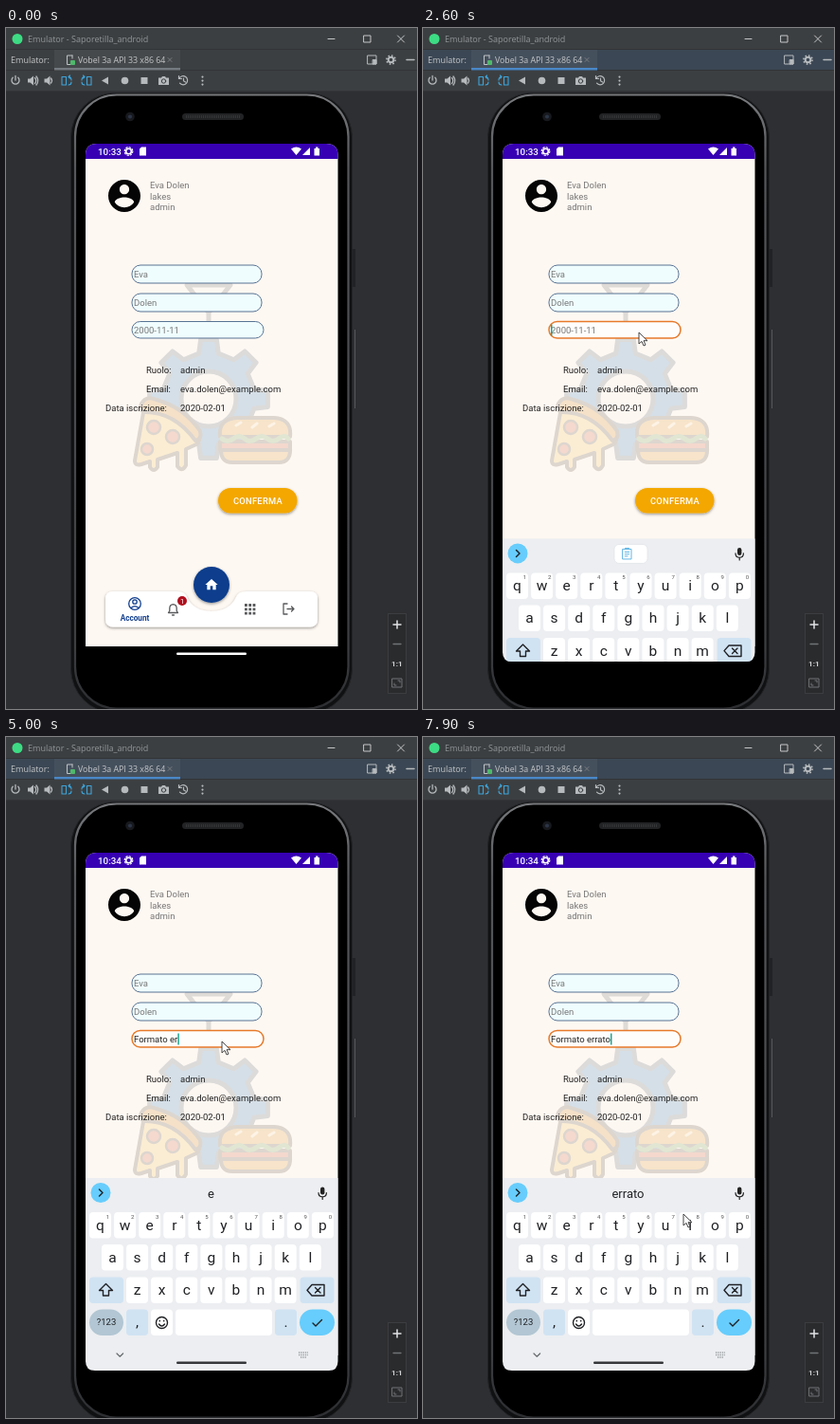
Recreate the animation shown at these times as an HTML page. Size 434 px wide and 718 px high, loop 8 s.

```html
<!DOCTYPE html>
<html lang="it">
<head>
<meta charset="utf-8">
<title>Profile form</title>
<style>
  html, body { margin: 0; width: 100%; height: 100%; overflow: hidden; background: #2e2f32; }
  svg { display: block; width: 100%; height: 100%; }
  text { font-family: Roboto, sans-serif; font-size: 9.5px; white-space: pre; }
  .ide text { font-family: "Open Sans", sans-serif; font-size: 9px; }
  .line { fill: none; stroke-linecap: round; stroke-linejoin: round; }
  .mid { text-anchor: middle; }
  .hint { fill: #777; }
  .field { fill: #f0fdfe; stroke: #587394; stroke-width: 1; }
</style>
</head>
<body>
<svg viewBox="0 0 434 718" preserveAspectRatio="none">
  <defs>
    <clipPath id="screenClip"><path d="M84 138V134Q84 122 96 122H338Q350.5 122 350.5 134V658Q350.5 668 341 668H94Q84 668 84 658Z"/></clipPath>
    <linearGradient id="rim" x2="0" y2="1">
      <stop offset="0" stop-color="#77797c"/><stop offset=".12" stop-color="#55575a"/>
      <stop offset=".9" stop-color="#3c3e41"/><stop offset="1" stop-color="#2c2d30"/>
    </linearGradient>
    <filter id="shadow" x="-20%" y="-30%" width="140%" height="180%">
      <feDropShadow dx="0" dy="1.2" stdDeviation="1.5" flood-opacity=".42"/>
    </filter>
  </defs>

  <g class="ide">
    <rect width="434" height="718" fill="#2e2f32"/>
    <rect width="434" height="66" fill="#3c3f41"/>
    <rect id="tabRow" y="23" width="434" height="21.5"/>
    <path d="M0 22.5H434M0 44.5H434M0 66.5H434" stroke="#323437"/>
    <circle cx="12" cy="11.5" r="5.5" fill="#3ddc84"/>
    <text x="23" y="15" fill="#929699">Emulator - Saporetilla_android</text>
    <path class="line" stroke="#c4c6c8" d="M340 11.5H347M378 8H385V15H378ZM413.5 8L420.5 15M420.5 8L413.5 15"/>
    <text x="5" y="37" fill="#c5c7c9">Emulator:</text>
    <rect x="51" y="23" width="133" height="21" fill="#fff" opacity=".05"/>
    <rect id="tabLine" x="51" y="42" width="133" height="2.5"/>
    <path class="line" stroke="#bfc3c6" d="M70 29H64.5V38.5H68M70 29V32"/>
    <rect x="68" y="34" width="5" height="5" rx="1" fill="#4fb86b"/>
    <text x="76" y="37" fill="#c5c7c9" style="font-size:8.8px">Vobel 3a API 33 x86 64</text>
    <path class="line" stroke="#777b7e" d="M171 31.5L175 35.5M175 31.5L171 35.5"/>
    <g stroke="#b6babd" class="line">
      <path d="M382 29H391V38H382Z"/><path fill="#b6babd" d="M387.5 33.5H391V38H387.5Z"/>
      <path stroke-width="1.5" d="M423 33.5H431"/>
      <circle cx="406.5" cy="33.5" r="2.8" stroke-width="2"/>
      <circle cx="406.5" cy="33.5" r="4.6" stroke-width="1.6" stroke-dasharray="1.6 2" stroke-linecap="butt"/>
      <path stroke-width="1.3" d="M7.2 52.3A4 4 0 1 0 12.8 52.3M10 50.5V55M30.5 52.5Q33 55.5 30.5 58.5M32 51Q35.5 55.5 32 60M47.5 53Q49.5 55.5 47.5 58"/>
      <path fill="#b6babd" stroke="none" d="M23 53.5H25.5L29 50.5V60.5L25.5 57.5H23ZM40.5 53.5H43L46.5 50.5V60.5L43 57.5H40.5ZM108 51.5V59.5L101 55.5ZM142.5 52H149.5V59H142.5ZM161 52.5H164L165 51H168L169 52.5H172V60H161Z"/>
      <circle cx="125.5" cy="55.5" r="3.8" fill="#b6babd" stroke="none"/>
      <circle cx="166.5" cy="56" r="2.2" fill="#b6babd" stroke="#3c3f41"/>
      <path stroke-width="1.2" d="M183 53A4.6 4.6 0 1 1 183.5 58.2M182.5 50.5V53.5H185.5M187.5 53V55.8L189.5 57"/>
      <path stroke-width="2.2" d="M207.5 51.5v.1M207.5 55.5v.1M207.5 59.5v.1"/>
    </g>
    <g class="line" stroke="#3da5dc" stroke-width="1.1">
      <path d="M59 51.5H63.5V60H59ZM66 51.5Q69 51.5 69 55M66 60Q69 60 69 57M67.5 50L66 51.5L67.5 53"/>
      <path d="M85.5 51.5H90V60H85.5ZM83 51.5Q80 51.5 80 55M83 60Q80 60 80 57M81.5 50L83 51.5L81.5 53"/>
    </g>
  </g>

  <g id="phone">
    <path d="M366 233H369V273H366Z" fill="#212225"/>
    <path d="M368.5 318V401" stroke="#55585b"/>
    <rect x="68.5" y="68.5" width="297" height="654" rx="47" fill="#101112" stroke="#232427"/>
    <rect x="73" y="70.5" width="288.5" height="647" rx="44" fill="#000" stroke="url(#rim)" stroke-width="2.2"/>
    <circle cx="131" cy="93.5" r="4.8" fill="#17191d"/><circle cx="131" cy="93.5" r="2.1" fill="#2c3546"/>
    <rect x="186" y="90" width="65" height="7" rx="3.5" fill="#222325"/>
    <path d="M190 93.5H247" stroke="#343638" stroke-width="3" stroke-dasharray="1 1"/>
  </g>

  <g clip-path="url(#screenClip)">
    <rect x="84" y="122" width="267" height="530" fill="#fef8f2"/>

    <g id="art" class="line" stroke="#dedad6" stroke-width="5">
      <path d="M191 271H237L214 300ZM214 300V328M204 283H224"/>
      <path id="gear" fill="#d5dfe7" stroke="#dcdbda" stroke-width="5"/>
      <circle cx="214" cy="391" r="29" fill="#fdf7f1" stroke="#dcdbda" stroke-width="5"/>
      <g stroke="#ddd6cf" stroke-width="4">
        <path fill="#fbedd3" d="M146 400L136 456Q136 462 143 460L152 457V463Q156 469 160 463V455L181 448V462Q186 469 190 461V444L201 439Q206 435 203 429Q182 401 148 397Z"/>
        <path fill="#f5e1c8" d="M143 396Q148 387 159 392Q188 400 205 425Q207 434 200 435Q178 405 147 405Q140 403 143 396Z"/>
        <g fill="#f5d9ce" stroke-width="2.5"><circle cx="156" cy="421" r="7"/><circle cx="176" cy="431" r="7"/><circle cx="149" cy="444" r="6"/></g>
        <path fill="#f7e4ca" d="M226 431Q224 412 244 411H283Q302 412 300 431Z"/>
        <path fill="#f7e4ca" d="M227 443H300Q301 458 288 458H239Q226 458 227 443Z"/>
        <path fill="#f4d8cd" d="M226 436H300V445H226Z"/>
        <path stroke="#e1e6d3" stroke-width="5" d="M228 433Q234 438 240 433T252 433T264 433T276 433T288 433T298 433"/>
        <path stroke="#fdf3e6" stroke-width="3" d="M243 419L248 416M260 421L265 417M278 420L283 417"/>
      </g>
    </g>

    <rect x="84" y="122" width="267" height="16" fill="#3700b3"/>
    <text id="clock" x="97" y="133.5" fill="#fff" style="font-size:9.8px;font-weight:500"></text>
    <circle cx="129.5" cy="130" r="2.8" class="line" stroke="#fff" stroke-width="1.6"/>
    <circle cx="129.5" cy="130" r="4.3" class="line" stroke="#fff" stroke-width="1.2" stroke-dasharray="1.4 2"/>
    <path fill="#fff" d="M143 125.5H148V134.5H141V127.5ZM301 127.5Q306.5 123.5 312 127.5L306.5 134ZM313 134L321 126V134ZM325.5 127H327V125.5H329.5V127H331V134.5H325.5Z"/>

    <path transform="translate(104.6 156.6) scale(1.7)" fill="#050505" d="M12 2C6.48 2 2 6.48 2 12s4.48 10 10 10 10-4.48 10-10S17.52 2 12 2zm0 3c1.66 0 3 1.34 3 3s-1.34 3-3 3-3-1.34-3-3 1.34-3 3-3zm0 14.2c-2.5 0-4.71-1.28-6-3.22.03-1.99 4-3.08 6-3.08 1.99 0 5.97 1.09 6 3.08-1.29 1.94-3.5 3.22-6 3.22z"/>
    <g class="hint">
      <text x="152" y="169">Eva Dolen</text><text x="152" y="180.5">lakes</text><text x="152" y="192">admin</text>
    </g>
    <rect class="field" x="133" y="250" width="137" height="19" rx="9"/>
    <rect class="field" x="133" y="280" width="137" height="19" rx="9"/>
    <rect class="field" id="dateBox" x="133" y="309.5" width="139" height="17.5" rx="8.7"/>
    <text class="hint" x="135" y="263">Eva</text>
    <text class="hint" x="135" y="293">Dolen</text>
    <text id="date" x="135" y="322"></text>
    <rect id="caret" y="312.5" width="1.5" height="12" fill="#1fa58f"/>
    <g fill="#222">
      <text x="148" y="364">Ruolo:</text><text x="184" y="364">admin</text>
      <text x="148" y="384">Email:</text><text x="184" y="384">eva.dolen@example.com</text>
      <text x="105" y="404">Data iscrizione:</text><text x="184" y="404">2020-02-01</text>
    </g>

    <rect x="224" y="485" width="83.5" height="26.5" rx="13.2" fill="#f3a704" filter="url(#shadow)"/>
    <text class="mid" x="266" y="502" fill="#fff" style="font-size:9.3px;font-weight:500;letter-spacing:.3px">CONFERMA</text>

    <path fill="#fff" filter="url(#shadow)" d="M113 594H180Q189 594 191 600Q198 615 217 615Q236 615 243 600Q245 594 254 594H321Q329 594 329 602V623Q329 631.5 321 631.5H113Q105 631.5 105 623V602Q105 594 113 594Z"/>
    <circle cx="217" cy="587" r="19" fill="#0b3d8c" filter="url(#shadow)"/>
    <path transform="translate(209 579) scale(.667)" fill="#fff" d="M10 20v-6h4v6h5v-8h3L12 3 2 12h3v8z"/>
    <g class="line" stroke="#123f8f" stroke-width="1.3">
      <circle cx="136" cy="607" r="6.3"/><circle cx="136" cy="605" r="2.2"/><path d="M132 611.5Q136 607.8 140 611.5"/>
    </g>
    <text class="mid" x="136" y="624.5" fill="#123f8f" style="font-size:8.2px;font-weight:700">Account</text>
    <g class="line" stroke="#58595b" stroke-width="1.3">
      <path d="M171.5 616.5H181.5L180.2 614.5V611.5Q180 608 176.5 607.6Q173 608 172.8 611.5V614.5ZM175.5 619H177.5"/>
      <path d="M297 607H293V618H297M297 612.5H304M301.5 610L304 612.5L301.5 615"/>
      <path stroke-width="2.8" stroke-linecap="butt" stroke-dasharray="2.8 1.5" d="M252 608.5H264M252 612.8H264M252 617.1H264"/>
    </g>
    <circle cx="186" cy="604" r="5" fill="#b00e1e"/>
    <text class="mid" x="186" y="606.8" fill="#fff" style="font-size:7.5px">1</text>

    <rect x="84" y="652" width="267" height="16" fill="#000"/>
    <g id="board">
      <rect x="84" y="465" width="267" height="204" fill="#eceef1"/>
      <circle cx="100" cy="480.5" r="10.5" fill="#67cdfc"/>
      <path class="line" stroke="#20262b" stroke-width="1.5" d="M98.5 477L102 480.5L98.5 484"/>
      <g id="clip">
        <rect x="202" y="471" width="35" height="20" rx="5" fill="#fff" stroke="#e0e3e7" stroke-width=".7"/>
        <path class="line" stroke="#62b6e4" d="M211 476H220V486.5H211ZM213.5 475H217.5M213.3 479H217.7M213.3 481.3H217.7M213.3 483.5H216"/>
      </g>
      <text id="word" class="mid" x="216.5" y="486" fill="#202124" style="font-size:13px"></text>
      <rect x="332" y="474.5" width="4.4" height="8" rx="2.2" fill="#222"/>
      <path class="line" stroke="#222" stroke-width="1.2" d="M330 480.5Q330 484.8 334.2 484.8Q338.4 484.8 338.4 480.5M334.2 485V487.5"/>
      <g id="keys"></g>
      <g class="line" stroke="#202124" stroke-width="1.4">
        <path d="M105.5 576.5L98.5 583.5H102.5V589H108.5V583.5H112.5Z"/>
        <path d="M318 583.2L323 577.5H336V589H323ZM326.5 580.5L332 586M332 580.5L326.5 586"/>
        <circle cx="164.5" cy="617.5" r="6"/><path d="M161.5 619Q164.5 623 167.5 619"/>
        <path stroke-width="1.7" d="M162.3 615.5v.1M166.7 615.5v.1"/>
        <path d="M324 618L327 621L333.5 614.5"/>
        <path stroke="#66696c" stroke-width="1.2" d="M117 650L120.3 653.2L123.6 650"/>
      </g>
      <path stroke="#9a9da0" stroke-width="1.3" stroke-dasharray="1.3 1" d="M309 649H319M309 651.5H319M311 654H317"/>
    </g>
  </g>
  <rect id="pill" x="180" y="658.5" width="74" height="2.6" rx="1.3"/>

  <g>
    <rect x="403.5" y="617.5" width="19" height="84" fill="#2a2b2d" stroke="#3b3d40"/>
    <path class="line" stroke="#e2e4e6" stroke-width="1.5" d="M409 629H417M413 625V633"/>
    <path class="line" stroke="#707376" stroke-width="1.3" d="M409 649.5H417"/>
    <text class="mid" x="412.8" y="673" fill="#d2d4d6" style="font-size:8px;font-weight:700">1:1</text>
    <path class="line" stroke="#707376" d="M408 686H418V695H408ZM410 691V693H412M414 688H416V690"/>
  </g>
  <path id="pointer" d="M0 0V12L3 9.4L5 14L7 13.1L5 8.7H9Z" fill="#fff" stroke="#333" stroke-width=".9"/>
</svg>

<script>
const LOOP = 8000, STEP = 100;
const FOCUS = 2500, TYPE_AT = 3600, KEY_MS = 150, BLINK = 500;
const PHRASE = 'Formato errato';
const $ = id => document.getElementById(id);
const parts = ['tabRow', 'tabLine', 'clock', 'dateBox', 'date', 'caret', 'board', 'clip', 'word', 'pill', 'pointer'];
const ui = Object.fromEntries(parts.map(id => [id, $(id)]));

// Pointer path: time, x, y
const PATH = [[2000, 395, 400], [2300, 228, 321], [7300, 228, 321], [7900, 275, 503]];

function gearPath(cx, cy, teeth, outer, root) {
  const points = [];
  const slice = 2 * Math.PI / teeth;
  for (let i = 0; i < teeth; i++) {
    for (const [shift, r] of [[-.27, root], [-.17, outer], [.17, outer], [.27, root]]) {
      const a = (i + shift) * slice - Math.PI / 2;
      points.push((cx + r * Math.cos(a)).toFixed(1) + ' ' + (cy + r * Math.sin(a)).toFixed(1));
    }
  }
  return 'M' + points.join('L') + 'Z';
}

function key(x, y, w, label = '', fill = '#fff', rx = 4, size = 15.5) {
  const mid = x + w / 2;
  return `<rect x="${x}" y="${y}" width="${w}" height="27.5" rx="${rx}" fill="${fill}"/>` +
    `<text class="mid" x="${mid}" y="${y + 13.5 + size * .34}" fill="#202124" style="font-size:${size}px">${label}</text>`;
}

function buildKeys() {
  const rows = [['qwertyuiop', 88, 501], ['asdfghjkl', 101, 535], ['zxcvbnm', 127, 569.5]];
  const pitch = 26.1, soft = '#d0e3f3';
  let html = '';
  for (const [letters, x0, y] of rows) {
    [...letters].forEach((ch, i) => {
      const x = x0 + i * pitch;
      html += key(x, y, 23, ch);
      if (y === 501) html += `<text class="mid" x="${x + 19.5}" y="508" fill="#555" style="font-size:6px">${(i + 1) % 10}</text>`;
    });
  }
  html += key(88, 569.5, 36, '', soft) + key(310.5, 569.5, 36, '', soft);
  html += key(88, 603.5, 36, '?123', '#b2c6d3', 13.7, 9.5) + key(127, 603.5, 23, ',', soft);
  html += key(153, 603.5, 23) + key(179, 603.5, 102) + key(284, 603.5, 23, '.', soft);
  html += key(310, 603.5, 37, '', '#67cdfc', 13.7);
  $('keys').innerHTML = html;
}

const typedAt = t => PHRASE.slice(0, Math.max(0, Math.floor((t - TYPE_AT) / KEY_MS) + 1));
const show = (el, on) => el.setAttribute('visibility', on ? 'visible' : 'hidden');

function pointerAt(t) {
  const i = PATH.findIndex(p => p[0] > t);
  if (i < 0) return PATH[PATH.length - 1].slice(1);
  const [t0, x0, y0] = PATH[i - 1], [t1, x1, y1] = PATH[i];
  const k = (t - t0) / (t1 - t0), e = k * k * (3 - 2 * k);
  return [x0 + (x1 - x0) * e, y0 + (y1 - y0) * e];
}

function draw(t) {
  const active = t >= 1300;
  ui.tabRow.setAttribute('fill', active ? '#3b4754' : '#3c3f41');
  ui.tabLine.setAttribute('fill', active ? '#4a88c7' : '#747a80');
  ui.clock.textContent = t < 5000 ? '10:33' : '10:34';

  const focused = t >= FOCUS;
  const typed = typedAt(t);
  ui.dateBox.style.stroke = focused ? '#e77a2b' : '';
  ui.dateBox.style.strokeWidth = focused ? 1.5 : '';
  ui.dateBox.style.fill = focused ? '#fffdfb' : '';
  ui.date.textContent = typed || '2000-11-11';
  ui.date.setAttribute('fill', typed ? '#222' : '#777');

  const lastKey = typed ? TYPE_AT + (typed.length - 1) * KEY_MS : FOCUS;
  show(ui.caret, focused && Math.floor((t - lastKey) / BLINK) % 2 === 0);
  ui.caret.setAttribute('x', 135 + (typed ? ui.date.getComputedTextLength() : 0));

  const rise = Math.min(1, Math.max(0, (t - FOCUS) / 250));
  ui.board.setAttribute('transform', `translate(0 ${204 * (1 - rise) ** 2})`);
  show(ui.board, focused);
  const suggesting = t >= 4300;
  ui.clip.style.display = suggesting ? 'none' : '';
  ui.word.textContent = suggesting ? typedAt(t - KEY_MS).trim().split(' ').pop() : '';

  show(ui.pill, !focused || t >= 3000);
  ui.pill.setAttribute('fill', focused ? '#35373a' : '#fff');

  const pointing = t >= PATH[0][0];
  show(ui.pointer, pointing);
  if (pointing) ui.pointer.setAttribute('transform', `translate(${pointerAt(t)})`);
}

$('gear').setAttribute('d', gearPath(214, 391, 8, 63, 49));
buildKeys();
const start = performance.now();
function tick() {
  const t = (performance.now() - start) % LOOP;
  draw(Math.floor(t / STEP) * STEP);
  requestAnimationFrame(tick);
}
tick();
</script>
</body>
</html>
```
